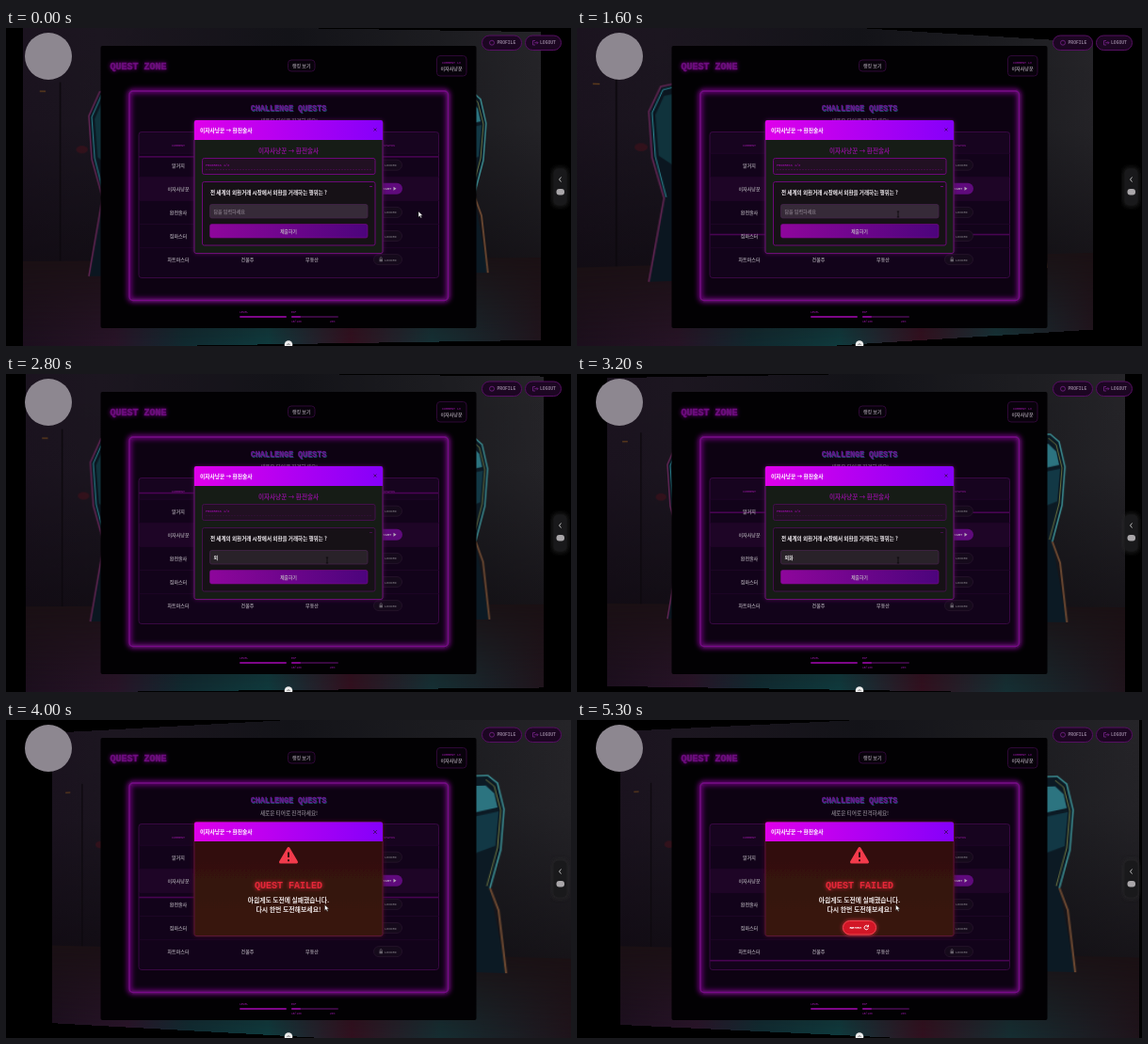
Animation of 600x338 px, one loop 5.4 s. Source, as an HTML page:

```html
<!DOCTYPE html>
<html>
<head>
<meta charset="utf-8">
<title>Quest Zone</title>
<style>
html, body { margin: 0; width: 100%; height: 100%; overflow: hidden; background: #000; }
#stage { position: absolute; left: 0; top: 0; width: 600px; height: 338px; overflow: hidden; perspective: 312px; perspective-origin: 300px 168px; }
#room { position: absolute; left: 25px; top: 0; width: 550px; height: 336px; }
#ui { position: absolute; left: 0; top: 0; }
svg { display: block; }
text { font-family: "Noto Sans CJK KR", "Noto Sans CJK", "Noto Sans", sans-serif; font-weight: 700; }
.mono { font-family: "Liberation Mono", monospace; font-weight: 700; }
.mid { text-anchor: middle; }
</style>
</head>
<body>
<div id="stage">
  <svg id="room" viewBox="25 0 550 336">
    <defs>
      <linearGradient id="wall">
        <stop offset="0" stop-color="#1b131f"/><stop offset=".14" stop-color="#1c1620"/>
        <stop offset=".5" stop-color="#131318"/><stop offset=".82" stop-color="#1d1d21"/>
        <stop offset="1" stop-color="#252428"/>
      </linearGradient>
      <linearGradient id="shade" x2="0" y2="1">
        <stop offset="0" stop-color="#08060b" stop-opacity="0"/><stop offset=".3" stop-color="#08060b" stop-opacity=".05"/>
        <stop offset=".74" stop-color="#0a060b" stop-opacity=".55"/>
      </linearGradient>
      <linearGradient id="floor">
        <stop offset="0" stop-color="#1c0f1e"/><stop offset=".17" stop-color="#281428"/>
        <stop offset=".3" stop-color="#102a30"/><stop offset=".46" stop-color="#0f3a3d"/>
        <stop offset=".62" stop-color="#32101f"/><stop offset=".78" stop-color="#153034"/>
        <stop offset="1" stop-color="#20141c"/>
      </linearGradient>
      <linearGradient id="fade" x2="0" y2="1">
        <stop offset="0" stop-color="#fff" stop-opacity=".1"/><stop offset="1" stop-color="#fff"/>
      </linearGradient>
      <mask id="low"><rect x="25" y="246" width="550" height="90" fill="url(#fade)"/></mask>
    </defs>
    <rect x="25" width="550" height="336" fill="url(#wall)"/>
    <rect x="25" width="550" height="336" fill="url(#shade)"/>
    <rect x="62" y="60" width="1.500" height="190" fill="#0d090e"/>
    <ellipse cx="85" cy="130" rx="6" ry="4" fill="#42101a" opacity=".6"/>
    <rect x="42" y="69" width="6" height="1.200" fill="#66401b"/>
    <rect x="25" y="246" width="550" height="90" fill="#1a1013"/>
    <rect x="25" y="246" width="550" height="90" fill="url(#floor)" mask="url(#low)"/>

    <path d="M118 66L103 70 92 95 95 140 106 180 92 262H118Z" fill="#0b1620"/>
    <path d="M118 76L106 79 98 98 101 138 118 150Z" fill="#10333c"/>
    <path d="M118 66L103 70 92 95 95 140 106 180 92 262" fill="none" stroke="#5d2450" stroke-width="1.600"/>
    <path d="M118 69L105 73 95 96 98 139 108 179" fill="none" stroke="#2b8794"/>

    <path d="M480 66H499L508 74 514 100 511 140 501 178 516 262H480Z" fill="#0c1a24"/>
    <path d="M480 76H497L505 84 508 98 480 104Z" fill="#2c7480"/>
    <path d="M480 108L509 102 506 136 480 146Z" fill="#123845"/>
    <path d="M480 66H499L508 74 514 100 511 140 501 178" fill="none" stroke="#39858a" stroke-width="1.600"/>
    <path d="M497 70L505 77 511 101 508 138 498 176" fill="none" stroke="#69703f"/>
    <path d="M501 178L509 200 516 262" fill="none" stroke="#684630" stroke-width="2"/>
  </svg>

  <svg id="ui" width="600" height="338" viewBox="0 0 600 338">
    <defs>
      <linearGradient id="bar"><stop offset="0" stop-color="#df00ea"/><stop offset="1" stop-color="#8500fa"/></linearGradient>
      <linearGradient id="btn"><stop offset="0" stop-color="#8e069c"/><stop offset="1" stop-color="#4c047c"/></linearGradient>
      <linearGradient id="fail" x2="0" y2="1"><stop offset="0" stop-color="#300d10"/><stop offset="1" stop-color="#39170f"/></linearGradient>
      <filter id="glow" x="-20%" y="-40%" width="140%" height="180%">
        <feGaussianBlur stdDeviation="2" result="b"/><feMerge><feMergeNode in="b"/><feMergeNode in="SourceGraphic"/></feMerge>
      </filter>
      <filter id="soft" x="-10%" y="-10%" width="120%" height="120%"><feGaussianBlur stdDeviation="2.500"/></filter>
      <clipPath id="tableBox"><rect x="141" y="110" width="319" height="155" rx="3"/></clipPath>
    </defs>

    <circle cx="45" cy="30" r="25" fill="#8d8790"/>

    <g fill="#1c0622" stroke="#570f63">
      <rect x="505.500" y="8" width="42" height="15.500" rx="7.700"/>
      <rect x="551.500" y="8" width="38" height="15.500" rx="7.700"/>
    </g>
    <g fill="none" stroke="#78248a" stroke-width=".8">
      <circle cx="516" cy="15.700" r="2.500"/><path d="M562 13.500h-2.500v4.500h2.500M561 15.700h4m-1.500-1.500l1.500 1.500-1.500 1.500"/>
    </g>
    <g font-size="4.700" fill="#8f7c96">
      <text class="mono" x="521.500" y="17.300">PROFILE</text><text class="mono" x="567" y="17.300">LOGOUT</text>
    </g>

    <rect x="100.500" y="19" width="399" height="300" rx="2" fill="#020103"/>
    <text class="mono" x="110.500" y="44" font-size="10" fill="#6d0a7e" stroke="#6d0a7e" stroke-width=".5" filter="url(#glow)">QUEST ZONE</text>
    <g fill="#08020b" stroke="#2e0836">
      <rect x="299.500" y="34" width="28.500" height="12" rx="3.500"/>
      <rect x="457.500" y="29.500" width="31.500" height="21.500" rx="3.500"/>
    </g>
    <text class="mid" x="313.800" y="42" font-size="5" fill="#8d8790">랭킹 보기</text>
    <text class="mono mid" x="473" y="37.500" font-size="3.300" fill="#75127f">CURRENT LV</text>
    <text class="mid" x="473" y="45" font-size="5" fill="#968f99">이자사냥꾼</text>

    <rect x="131" y="67" width="338.500" height="222.500" rx="4" fill="#0d0212"/>
    <rect x="131" y="67" width="338.500" height="222.500" rx="4" fill="none" stroke="#6c087a" stroke-width="5" filter="url(#soft)"/>
    <rect x="131" y="67" width="338.500" height="222.500" rx="4" fill="none" stroke="#780a88" stroke-width="1.300"/>
    <text class="mono mid" x="300.800" y="88.700" font-size="8.400" fill="#155566">CHALLENGE QUESTS</text>
    <text class="mono mid" x="300" y="88" font-size="8.400" fill="#6a1892" stroke="#6a1892" stroke-width=".3">CHALLENGE QUESTS</text>
    <text class="mid" x="300.500" y="101" font-size="5.600" fill="#77707b">새로운 티어로 진격하세요!</text>

    <g clip-path="url(#tableBox)">
      <rect x="141" y="110" width="319" height="155" fill="#12031a"/>
      <rect x="141" y="110" width="319" height="24" fill="#17041f"/>
      <rect x="141" y="158.500" width="319" height="25" fill="#1e0526"/>
      <rect id="scan" x="141" width="319" height="1.600" fill="#8a0698" opacity=".45"/>
    </g>
    <rect x="141" y="110.500" width="318.500" height="155" rx="3" fill="none" stroke="#380842"/>
    <g font-size="3.300" fill="#75127f">
      <text class="mono mid" x="183" y="126">CURRENT</text><text class="mono mid" x="407" y="126">STATUS</text>
    </g>
    <g id="rows"></g>

    <g font-size="3" fill="#74127f">
      <text class="mono" x="248" y="302.500">LEVEL</text><text class="mono" x="303" y="302.500">EXP</text>
      <text class="mono" x="303" y="312.500">15/100</text><text class="mono" x="344" y="312.500">20%</text>
    </g>
    <rect x="248" y="306" width="50" height="2" rx="1" fill="#7d0688"/>
    <rect x="303" y="306" width="50" height="2" rx="1" fill="#380940"/>
    <rect x="303" y="306" width="10" height="2" rx="1" fill="#7d0688"/>

    <rect x="580" y="148" width="17" height="42" rx="6" fill="#2a2a2c" opacity=".7" filter="url(#soft)"/>
    <rect x="581.500" y="149.500" width="14" height="39" rx="5" fill="#19191b"/>
    <path d="M589.500 158.500l-2 2.500 2 2.500" fill="none" stroke="#bbb"/>
    <rect x="584.500" y="171" width="8.500" height="6.500" rx="3" fill="#aaa7aa"/>
    <circle cx="300" cy="336.500" r="4.300" fill="#eee"/>
    <path d="M298.500 337l1.500-1.500 1.500 1.500" fill="none" stroke="#444" stroke-width=".8"/>

    <g id="quiz">
      <rect x="200" y="98.500" width="200" height="141" rx="2" fill="#191a18" stroke="#6c0a77" filter="url(#glow)"/>
      <path d="M200 119V100q0-2 2-2h196q2 0 2 2v19Z" fill="url(#bar)"/>
      <text x="206" y="110.700" font-size="5.700" fill="#fff">이자사냥꾼 → 환전술사</text>
      <path d="M390.500 106.500l3 3m0-3l-3 3" stroke="#4b087d"/>
      <text class="mid" x="300" y="132.500" font-size="6.600" fill="#84118f">이자사냥꾼 → 환전술사</text>
      <g id="boxes">
        <rect x="208.500" y="138.500" width="183.500" height="17" rx="2" fill="#211022"/>
        <rect x="208.500" y="163.500" width="183.500" height="67.500" rx="2" fill="#161116"/>
        <path d="M212 150.500h176" stroke-width=".8" stroke-dasharray="2 1" opacity=".5"/>
        <path d="M386 168.500h3"/>
      </g>
      <text class="mono" x="212" y="146.500" font-size="3.500" fill="#880d94">PROGRESS 1/3</text>
      <text x="217" y="177.300" font-size="5.550" fill="#f2edf2">전 세계의 외환거래 시장에서 외환을 거래하는 행위는 ?</text>
      <rect id="field" x="216.500" y="187.500" width="167.500" height="14.500" rx="2" stroke="#4a254f" stroke-width=".7"/>
      <text id="answer" x="220.500" y="196.700" font-size="5"></text>
      <rect x="216.500" y="208.500" width="167.500" height="14.500" rx="2" fill="url(#btn)" stroke="#7c0a8a" stroke-width=".6"/>
      <text class="mid" x="300" y="217.500" font-size="4.800" fill="#b7a3bd">제출하기</text>
    </g>

    <g id="failed">
      <rect x="200" y="108.500" width="200" height="121" rx="2" fill="url(#fail)" stroke="#5c1236" filter="url(#glow)"/>
      <path d="M200 129V110.500q0-2 2-2h196q2 0 2 2V129Z" fill="url(#bar)"/>
      <text x="206" y="121" font-size="5.700" fill="#fff">이자사냥꾼 → 환전술사</text>
      <path d="M390 117l4 4m0-4l-4 4" stroke="#4b087d"/>
      <path d="M300 136.500l8.500 14.500h-17Z" fill="#f33b4c" stroke="#f33b4c" stroke-width="3" stroke-linejoin="round"/>
      <path d="M300 140.500v5.500m0 2.200v2" stroke="#35100f" stroke-width="2"/>
      <text class="mono mid" x="300" y="178.500" font-size="10" fill="#e52738" filter="url(#glow)">QUEST FAILED</text>
      <g fill="#eae2e2">
        <text class="mid" x="300" y="194" font-size="6.800">아쉽게도 도전에 실패했습니다.</text>
        <text class="mid" x="300" y="203.800" font-size="6.900">다시 한번 도전해보세요!</text>
      </g>
      <g id="retry">
        <rect x="282.500" y="213.500" width="35" height="14.500" rx="7.200" fill="#d21828" stroke="#f0434f" filter="url(#glow)"/>
        <text class="mono" x="289.500" y="222.200" font-size="4.300" fill="#fff">RETRY</text>
        <path d="M309 219.300a2.200 2.200 0 1 0 .3 2.200M309.500 217.800v2h-2" fill="none" stroke="#fff" stroke-width=".9"/>
      </g>
    </g>

    <path id="arrow" d="M0 0v6l1.500-1.300 1 2.200 1-.5-1-2.100h2Z" fill="#fff" stroke="#111" stroke-width=".4"/>
    <path id="beamCursor" d="M-1.200-3H1.200M0-3V3M-1.200 3H1.200" stroke="#08060a" stroke-width=".8"/>
  </svg>
</div>
<script>
const LOOP = 5400, STEP = 100, FAIL_AT = 3600;
const $ = id => document.getElementById(id);
const show = (id, on) => $(id).style.display = on ? "" : "none";
const clamp = v => Math.max(0, Math.min(1, v));

const label = (x, y, text) => `<text class="mid" x="${x}" y="${y + 2}" font-size="5" fill="#968f9a">${text}</text>`;
const locked = y => `<rect x="390.500" y="${y - 5.5}" width="30" height="11" rx="5.500" fill="#150a1b" stroke="#27152c" stroke-width=".8"/>
  <rect x="396.500" y="${y - 0.5}" width="3.400" height="2.700" fill="#6a646e"/>
  <path d="M397.200 ${y - 0.5}v-1a1 1 0 0 1 2 0v1" fill="none" stroke="#6a646e" stroke-width=".7"/>
  <text class="mono" x="402" y="${y + 1.5}" font-size="3.500" fill="#6a646e">LOCKED</text>`;
const start = y => `<rect x="384" y="${y - 6}" width="37" height="12" rx="6" fill="#5f0a7c"/>
  <text class="mono" x="398" y="${y + 1.2}" font-size="3.800" fill="#b5a5ba">START</text>
  <path d="M411.500 ${y - 2}l3 2-3 2Z" fill="#b5a5ba"/>`;

$("rows").innerHTML = ["알거지", "이자사냥꾼", "환전술사", "짐마스터", "차트마스터"].map((name, i) => {
  const y = 145.7 + 25.1 * i;
  return `<path d="M141 ${y - 12.5}h319" stroke="#22072a" stroke-width=".7"/>` + label(183, y, name) + (i === 1 ? start(y) : locked(y));
}).join("") + label(256.5, 246, "건물주") + label(325, 246, "부동산");

// Pointer stops: time, x, y
const stops = [[0, 438, 195], [800, 418, 188], [1600, 341, 198], [3500, 341, 198], [3800, 338.5, 196.5], [LOOP, 338.5, 196.5]];
function pointerAt(t) {
  const i = stops.findIndex(s => s[0] > t);
  const a = stops[i - 1], b = stops[i];
  const k = (t - a[0]) / (b[0] - a[0]), e = k * k * (3 - 2 * k);
  return [a[1] + (b[1] - a[1]) * e, a[2] + (b[2] - a[2]) * e];
}

const typing = ["ㅇ", "오", "외", "외ㅎ", "외호", "외화"];

function draw(t) {
  const tilt = 6.8 * Math.cos(2 * Math.PI * (t - 1350) / 6400);
  $("room").style.transform = `rotateY(${tilt}deg)`;
  $("scan").setAttribute("y", 109.2 + 155 * ((t + 520) / 3000 % 1));

  const failed = t >= FAIL_AT, focused = t >= 2500;
  show("quiz", !failed);
  show("failed", failed);
  $("retry").style.opacity = clamp((t - 4400) / 300);
  $("boxes").setAttribute("stroke", focused ? "#42104a" : "#6c0878");
  $("field").setAttribute("fill", focused ? "#292229" : "#362a38");

  const typed = Math.floor((t - 2600) / 100);
  $("answer").textContent = typed < 0 ? "답을 입력하세요" : typing[Math.min(typed, typing.length - 1)];
  $("answer").setAttribute("fill", typed < 0 ? "#7d727f" : "#eee");

  const [x, y] = pointerAt(t);
  const inField = !failed && x < 384 && y > 187;
  show("arrow", !inField);
  show("beamCursor", inField);
  $(inField ? "beamCursor" : "arrow").setAttribute("transform", `translate(${x} ${y})`);
}

function tick() {
  draw(Math.floor(performance.now() % LOOP / STEP) * STEP);
  requestAnimationFrame(tick);
}
tick();
</script>
</body>
</html>
```
